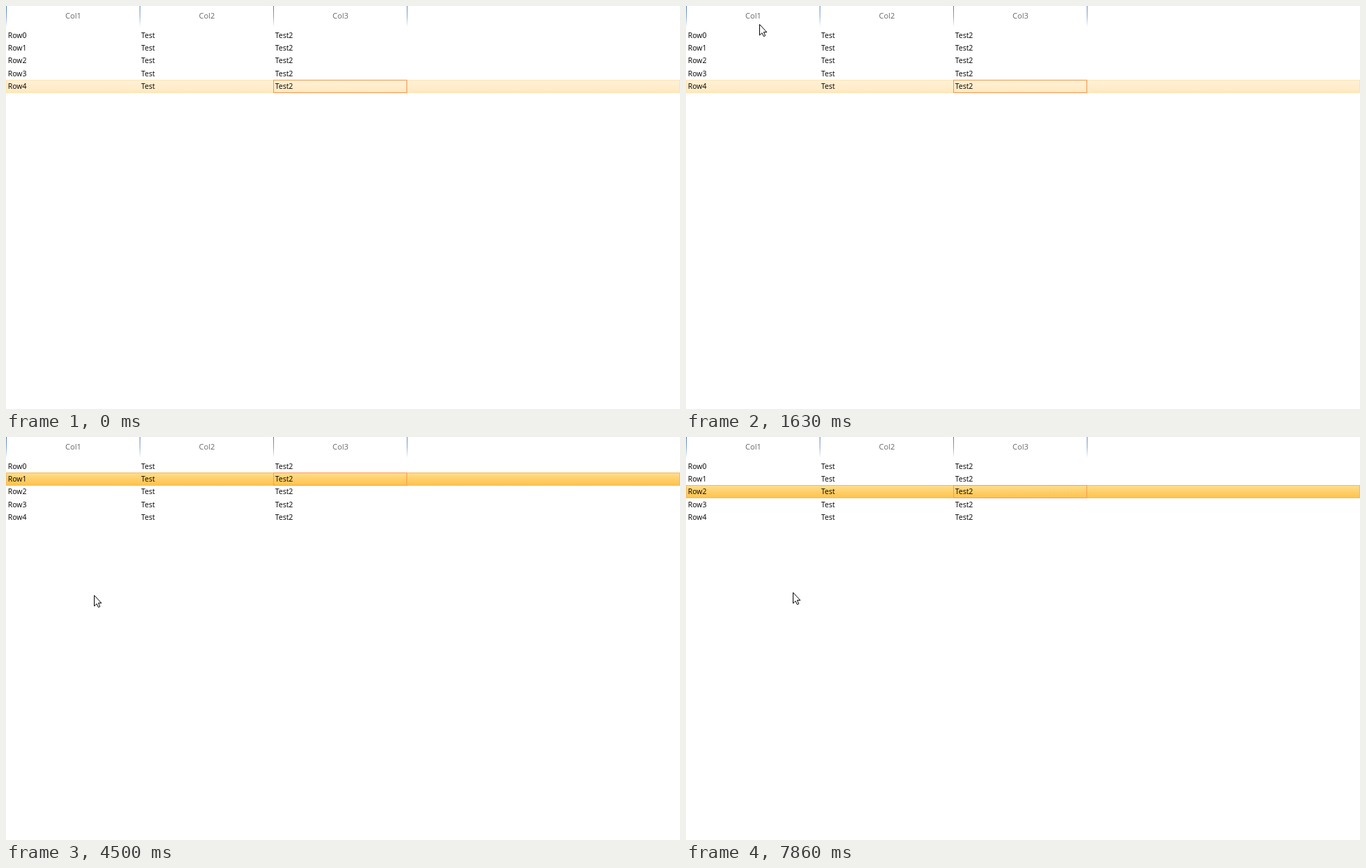
Animation of 966x579 px, one loop 8000 ms. Source, as an HTML page:

```html
<!DOCTYPE html>
<html lang="en">
<head>
<meta charset="utf-8">
<title>Grid navigation</title>
<style>
html, body { margin: 0; width: 100%; height: 100%; overflow: hidden; background: #fff; }
svg { display: block; }
text { font: 10.5px "Open Sans", "Noto Sans", sans-serif; fill: #000; }
.head { font-size: 11px; fill: #686868; text-anchor: middle; }
</style>
</head>
<body>
<svg id="stage" width="966" height="579" viewBox="0 0 966 579">
  <defs>
    <linearGradient id="idle" x2="0" y2="1"><stop stop-color="#fff2d9"/><stop offset="1" stop-color="#ffe8bf"/></linearGradient>
    <linearGradient id="active" x2="0" y2="1"><stop stop-color="#ffdd8b"/><stop offset="1" stop-color="#ffc24b"/></linearGradient>
    <linearGradient id="hover" x2="0" y2="1"><stop stop-color="#fffbe8"/><stop offset="1" stop-color="#fff2cc"/></linearGradient>
    <linearGradient id="rule" x2="0" y2="1"><stop stop-color="#4f79bd"/><stop offset=".5" stop-color="#7f9fd4"/><stop offset="1" stop-color="#fff"/></linearGradient>
  </defs>
</svg>
<script>
const LOOP = 8000;
const CLICK = 1720;     // the grid takes focus and selects its first cell
const BACK = 7780;      // Shift+Tab
const TICK = 80;        // pointer refresh
const ROWS = 5, COLS = 3, COL_WIDTH = 191.5;

const stage = document.getElementById("stage");
const rowTop = r => Math.round(33 + 18.2 * r);
const colLeft = c => Math.floor(COL_WIDTH * c);

// Each Tab press moves the focus one cell on
const tabs = [2780, 3270, 3730, 4120, 4420, 4650, 4900, 5370, 5890];

// Pointer glides: start, end, x, y reached
const entry = [60, 558];
const glides = [
  [70, 860, 88, 72],
  [920, 1230, 95, 50],
  [1340, 1500, 104, 23],
  [1580, 1720, 109, 35],
  [2310, 2400, 116, 41],
  [2560, 3020, 120, 47],
  [3890, 4500, 126, 227],
  [6910, 6910, 130, 229],
  [7310, 7470, 139, 225],
  [7620, 7860, 153, 223]
];

function set(node, attrs) {
  for (const key in attrs) node.setAttribute(key, attrs[key]);
}

function add(tag, attrs, text = "") {
  const node = document.createElementNS("http://www.w3.org/2000/svg", tag);
  set(node, attrs);
  node.textContent = text;
  return stage.appendChild(node);
}

function box(row, left, right) {
  return { x: left + 0.5, y: rowTop(row) + 0.5, width: right - left - 1, height: 18 };
}

const hoverBar = add("rect", { fill: "url(#hover)", stroke: "#fceec4" });
const rowBar = add("rect", {});
const cellBox = add("rect", { fill: "none" });

for (let c = 0; c <= COLS; c++) {
  add("rect", { x: COL_WIDTH * c, y: 0, width: 1, height: 30, fill: "url(#rule)" });
}
for (let c = 0; c < COLS; c++) {
  add("text", { x: COL_WIDTH * (c + 0.5) + 0.7, y: 18, class: "head" }, "Col" + (c + 1));
  for (let r = 0; r < ROWS; r++) {
    add("text", { x: colLeft(c) + 2.7, y: rowTop(r) + 13 }, ["Row" + r, "Test", "Test2"][c]);
  }
}

const pointer = add("path", {
  d: "M.5 .5V16L4 12.7L6.4 17.7L8.7 16.7L6.4 11.6H10.8Z",
  fill: "#fff", stroke: "#000"
});

const smooth = k => k * k * (3 - 2 * k);

function pointerAt(t) {
  let [x, y] = entry;
  for (const [start, end, toX, toY] of glides) {
    if (t < start) break;
    const gaps = Math.round((end - start) / TICK);
    const step = gaps ? Math.min(gaps, Math.floor((t - start) / (end - start) * gaps + 0.001)) : 0;
    const k = smooth((step + 1) / (gaps + 1));
    x += (toX - x) * k;
    y += (toY - y) * k;
  }
  return [Math.round(x), Math.round(y)];
}

function focusAt(t) {
  if (t < CLICK) return ROWS * COLS - 1;
  return tabs.filter(time => time <= t).length - (t >= BACK ? 1 : 0);
}

function hoverAt(t, y) {
  const row = Math.floor((y - 33) / 18.2);
  const ignored = t >= 920 && t < CLICK;
  return ignored || row >= ROWS ? -1 : row;
}

function draw(t) {
  const focus = focusAt(t);
  const row = Math.floor(focus / COLS), col = focus % COLS;
  const active = t >= CLICK;
  const [x, y] = pointerAt(t);
  const hot = hoverAt(t, y);

  set(rowBar, {
    ...box(row, 0, 966),
    fill: active ? "url(#active)" : "url(#idle)",
    stroke: active ? "#f0bd61" : "#ffe3b1"
  });
  set(cellBox, {
    ...box(row, colLeft(col), colLeft(col + 1) + 1),
    stroke: active ? "#ff9a4e" : "#f6954a"
  });
  set(hoverBar, {
    ...box(Math.max(hot, 0), 0, 966),
    visibility: hot < 0 || hot === row ? "hidden" : "visible"
  });
  set(pointer, {
    transform: `translate(${x} ${y})`,
    visibility: t < glides[0][0] ? "hidden" : "visible"
  });
}

const began = performance.now();
function tick() {
  draw((performance.now() - began) % LOOP);
  requestAnimationFrame(tick);
}
draw(0);
requestAnimationFrame(tick);
</script>
</body>
</html>
```
